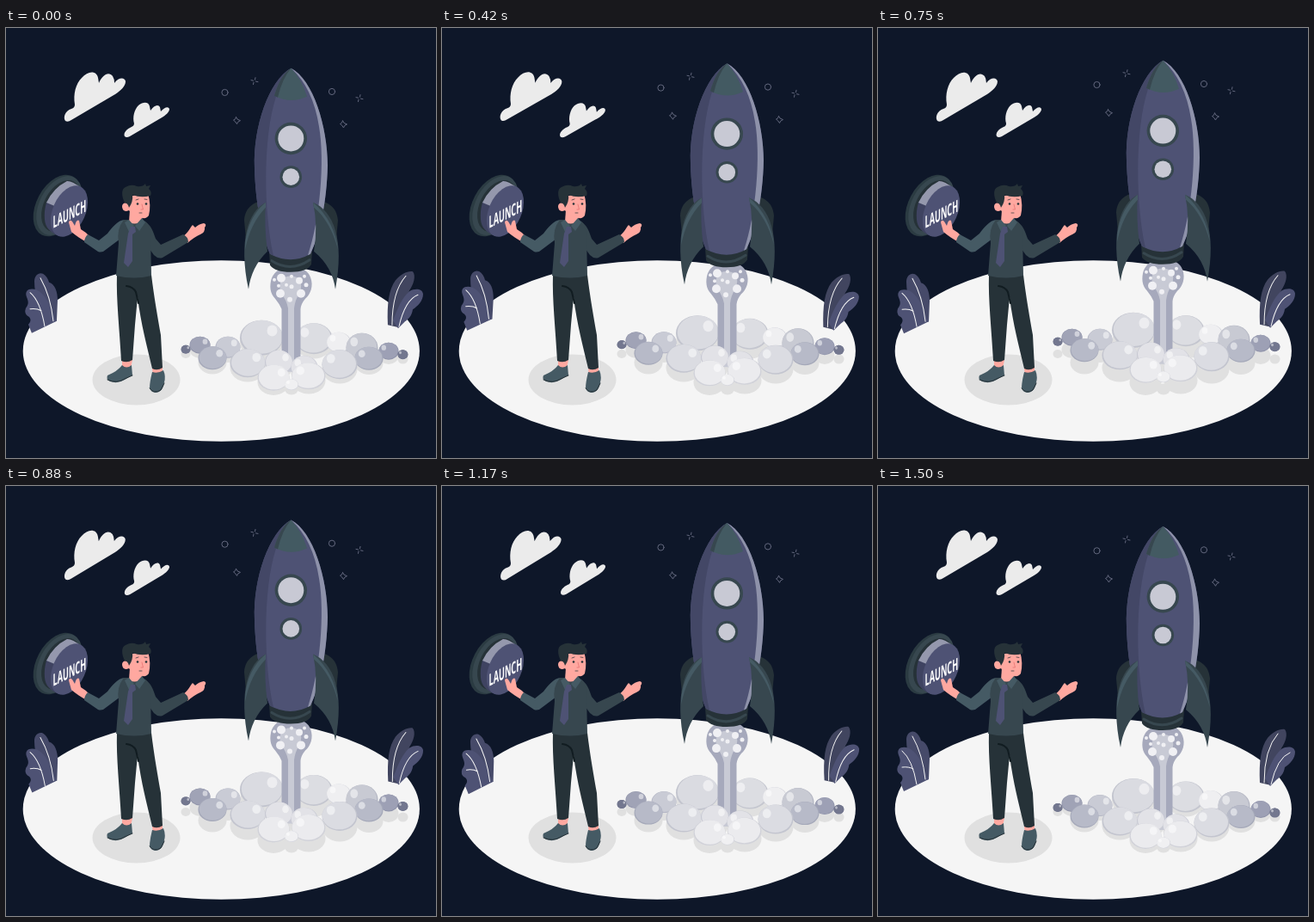
Recreate the animation shown at these times as an HTML page. Size 500 by 500 pixels, loop 1540 ms.

```html
<!DOCTYPE html>
<html lang="en">
<head>
<meta charset="utf-8">
<title>Launch</title>
<style>
html, body { margin: 0; height: 100%; overflow: hidden; background: #0e1729; }
svg { display: block; width: 100vw; height: 100vh; }
.label { font: bold 19.5px "Open Sans", sans-serif; fill: #fff; }
.line { fill: none; stroke-linecap: round; stroke-linejoin: round; }
</style>
</head>
<body>
<svg viewBox="0 0 500 500">
  <ellipse cx="250.3" cy="375.5" rx="230.6" ry="105.3" fill="#f5f5f5"/>
  <ellipse cx="151.5" cy="409" rx="51" ry="29.5" fill="#e0e0e0"/>
  <g id="shadows" fill="#e0e0e0"></g>

  <g id="clouds" fill="#ebebeb">
    <path d="M69 108C66 104 69 96 76 94Q80 93 80 89C78 77 81 65 88 58C95 50 105 49 107 58L108 64C112 55 119 50 124 56Q126 59 126 64C131 57 138 57 139 62C139 68 133 73 127 77L76 107Q72 110 69 108Z"/>
    <path d="M138 126C136 122 141 117 146 115Q149 114 149 111C147 104 149 95 154 90C160 85 166 86 167 91L168 96C172 90 177 88 179 92L180 97C185 91 190 91 190 95C189 99 184 103 178 106L144 126Q140 128 138 126Z"/>
  </g>

  <g id="plants">
    <path fill="#464a69" d="M40 346C39 328 33 310 33 295C33 288 38 284 43 286Q48 289 50 296C57 298 60 307 60 317L59 341Z"/>
    <path fill="#4e5274" d="M30 355L26 345C30 341 29 337 25 335Q21 332 23 326C27 321 26 318 24 313C21 305 28 302 36 305C43 308 50 318 53 329L59 341Z"/>
    <path fill="#41455f" d="M444 345C443 320 445 304 453 293C459 286 467 282 473 283C477 288 474 298 469 305L457 348Z"/>
    <path fill="#4e5274" d="M456 349L450 340C455 327 460 314 469 306C476 302 484 303 485 309C485 317 479 323 473 327C472 335 467 339 464 341Z"/>
    <g class="line" stroke="#f5f5f5">
      <path d="M40 291Q52 312 55 341M28 308Q40 318 45 347M28 327Q36 326 41 329M465 288Q449 306 449 345M479 310Q464 316 457 347"/>
    </g>
  </g>

  <g id="button">
    <ellipse cx="59.500" cy="206.500" rx="24" ry="38.500" transform="rotate(28 59.500 206.500)" fill="#2b3b42"/>
    <ellipse cx="62" cy="206.500" rx="23" ry="37" transform="rotate(28 62 206.500)" fill="#37474f"/>
    <ellipse cx="64" cy="207" rx="20" ry="32" transform="rotate(27 64 207)" fill="#263238"/>
    <path fill="#3f4361" d="M47 203L71 178Q77 179 87 186L62 242Q46 236 45 223Q44 213 47 203Z"/>
    <path fill="#9598ad" d="M47 203Q55 186 71 178Q78 178 87 186Q69 191 59 208Z"/>
    <ellipse cx="73.500" cy="213" rx="19" ry="31.500" transform="rotate(24 73.500 213)" fill="#4e5274"/>
    <text class="label" transform="matrix(.47 -.24 0 1 54.500 233)">LAUNCH</text>
  </g>

  <g id="man">
    <path fill="#ffa8a0" d="M135 387L147 386L145 396L135 397ZM170 395L182 394L182 405L171 406Z"/>
    <path fill="#455a64" d="M135 392Q140 397 146 392L147 404Q142 406 138 409Q130 414 121 411Q116 409 118 404Q130 399 135 392ZM170 400Q177 402 183 398Q186 405 184 412Q183 420 178 423Q170 426 167 419Q167 412 170 400Z"/>
    <path class="line" stroke="#263238" d="M118 409Q129 414 138 408L147 404M167 419Q172 426 180 421L184 413"/>
    <path fill="#263238" d="M129 287L169 287C172 312 177 340 180 357L182 395Q176 399 170 396C164 370 157 345 153 313L150 345L147 386Q141 390 134 387C132 350 128 315 129 287Z"/>
    <path class="line" stroke="#111c21" stroke-width="2" d="M140 300Q148 301 151 307L154 320"/>
    <path fill="#ffa8a0" d="M94 249C88 246 81 241 76 237L73 226Q74 222 77 225L80 230Q82 222 85 224L87 234Q94 238 98 243ZM206 242C212 238 214 232 217 229L220 232Q224 228 230 227Q234 228 231 232Q232 237 226 240Q219 243 211 250Z"/>
    <path fill="#455a64" d="M137 223C130 224 124 231 118 239L108 247L95 240Q91 244 91 249L107 260Q112 262 117 257L133 245Z"/>
    <path fill="#37474f" d="M161 225C168 228 171 236 174 245L180 252L206 240Q212 243 212 249L182 267Q177 269 172 264L161 249Z"/>
    <path fill="#37474f" d="M137 223L158 223C165 225 168 231 168 240L169 288Q149 293 128 288L131 250Q128 234 137 223Z"/>
    <path fill="#ffa8a0" d="M144 211L159 216L158 224Q152 230 143 226Z"/>
    <path fill="#455a64" d="M143 223L149 230L143 237L138 226ZM158 221L150 230L155 236L162 226Z"/>
    <path fill="#4e5274" d="M145 231L150 231L151 237L147 240L147 271L142 278L137 273L142 239Z"/>
    <path fill="#ffa8a0" d="M142 196L165 192Q169 206 166 218Q163 223 155 220Q147 218 143 212Q136 215 135 208Q135 202 142 204Z"/>
    <path fill="#263238" d="M143 209Q142 204 138 203C134 195 134 187 139 185Q146 181 152 184Q159 185 162 181L163 184L168 183L166 187Q170 190 168 195Q157 198 147 194Q148 202 143 209Z"/>
    <path class="line" stroke="#263238" stroke-width=".7" d="M151 200L154 199M161 199L164 199.500M155 215L158 215"/>
    <path class="line" stroke="#e57373" stroke-width=".8" d="M158 205L159.500 211L157 211"/>
    <g fill="#263238"><circle cx="153" cy="204.500" r="1.300"/><circle cx="163" cy="204.500" r="1.300"/></g>
  </g>

  <g id="lift">
    <g class="line" stroke="#62677d">
      <circle cx="254.500" cy="75.300" r="3.600"/>
      <circle cx="379" cy="74.300" r="3.600"/>
      <path id="star" d="M267.500 104Q268 107 272.500 108Q269 109 268.500 112Q267 109 264.500 107.500Q267 107 267.500 104Z"/>
      <use href="#star" transform="translate(124 4.300)"/>
      <path id="spark" d="M290 58L289.500 60.500M288 63.500L287.500 66M285 61L287.500 61.500M290.500 62.500L293 63"/>
      <use href="#spark" transform="translate(122 20)"/>
    </g>
    <g id="backPuffs"></g>
    <g id="exhaust">
      <path fill="#a6a9bc" d="M320.500 388L320.500 327Q318 321 313 315C307 309 306 300 309 291Q314 279 331 277Q350 279 354 290C358 300 354 310 348 315Q343 321 342.500 327L342.500 388Z"/>
      <path fill="#c8cad5" d="M328 400L328 326Q326 316 320 309Q316 298 322 291Q331 286 340 291Q346 299 341 309Q336 317 335 326L335 400Z"/>
      <g id="bubbles" fill="#f0f0f4"></g>
    </g>
    <g id="frontPuffs"></g>
    <g id="rocket">
      <path fill="#263238" d="M306 200C289 201 278 208 277 224L279 246L304 230ZM356 200C374 201 385 208 386 224L384 246L358 230Z"/>
      <path fill="#263238" d="M306 261L307 276Q313 284 331 284Q350 284 355 275L356 260Z"/>
      <path class="line" stroke="#37474f" stroke-width="3" d="M309 271Q331 285 353 270"/>
      <path fill="#4e5274" d="M331.500 47C306 61 287 115 289 163C290 205 298 242 307 263Q331 276 354 263C365 240 373 203 374 160C374 115 357 60 331.500 47Z"/>
      <path fill="#434766" d="M331.500 47C306 61 287 115 289 163C290 205 298 242 307 263L311 265C300 215 298 130 314 80Q321 59 331.500 47Z"/>
      <path fill="#8e92aa" d="M331.500 47C357 60 374 115 374 160C373 203 365 240 354 263L351 264.500C365 224 371 155 364 115Q357 70 331.500 47Z"/>
      <path fill="#435a62" d="M331.500 47Q319 55 312 79Q331 89 350 80Q344 60 331.500 47Z"/>
      <path fill="#37474f" d="M331.500 47Q319 55 312 79L316 81Q321 59 331.500 47Z"/>
      <g fill="#37474f"><circle cx="331.300" cy="128.800" r="18.700"/><circle cx="331.300" cy="173.500" r="12.800"/></g>
      <g fill="#c8c9d4"><circle cx="331.300" cy="128.800" r="15"/><circle cx="331.300" cy="173.500" r="9.800"/></g>
      <path fill="#37474f" d="M302 203C282 213 270 247 282 304C284 288 291 272 304 260Q300 231 302 203ZM357 203C381 213 394 247 383 304C381 288 373 272 358 260Q363 231 357 203Z"/>
      <path fill="#455a64" d="M302 203C285 217 278 238 278 258C282 238 290 221 302 209ZM357 203C374 217 384 238 386 258C381 238 371 219 358 209Z"/>
    </g>
  </g>
</svg>
<script>
const $ = id => document.getElementById(id);

function ellipse(parent, cx, cy, rx, ry, attrs = {}) {
  const el = document.createElementNS('http://www.w3.org/2000/svg', 'ellipse');
  Object.entries({ cx, cy, rx, ry, ...attrs }).forEach(([k, v]) => el.setAttribute(k, v));
  $(parent).append(el);
}

// Dark rim, lit body and a highlight on the side facing the exhaust.
function puff(parent, [x, y, rx, ry, color]) {
  const side = x < 331 ? 1 : -1;
  ellipse('shadows', x, y + 5, rx, ry);
  ellipse(parent, x, y, rx, ry, { fill: color });
  ellipse(parent, x, y, rx, ry, { fill: '#4e5274', opacity: .17 });
  ellipse(parent, x + side * rx * .03, y - ry * .04, rx * .96, ry * .95, { fill: color });
  ellipse(parent, x + side * rx * .5, y - ry * .4, rx * .24, ry * .32, { fill: '#fff', opacity: .5 });
}

const back = [
  [209, 374, 5.5, 5, '#73778f'], [225.5, 369, 12, 10, '#a0a3b6'],
  [258, 371.5, 14.5, 12.5, '#c9cbd5'], [297, 360.5, 25, 20.5, '#dadbe1'],
  [358, 361.5, 21.5, 18, '#dcdde2'], [387, 366, 14, 12, '#efeff1'],
  [414, 372, 18.5, 17, '#c8cad3'], [445, 376, 11.5, 10, '#9da0b5'],
  [461.5, 380, 6, 5.5, '#73778f']
];
const front = [
  [422, 384.5, 16.5, 13.5, '#b7bac8'], [240, 384, 16.5, 13.5, '#b7bac8'],
  [281, 390, 20.5, 16.5, '#dbdce2'], [388, 391.5, 20.5, 17, '#dbdce2'],
  [317, 389, 16, 14, '#e2e2e7'], [347, 395, 15.5, 13.5, '#e2e2e7'],
  [311, 407, 18.5, 15, '#ebebee'], [352, 405, 19.5, 15.5, '#ebebee'],
  [332, 415, 8, 6.5, '#f0f0f2']
];
back.forEach(p => puff('backPuffs', p));
front.forEach(p => puff('frontPuffs', p));

[[320, 291, 5], [341, 294, 4], [319, 309, 5], [343, 309, 5], [330, 316, 3], [332, 289, 2],
 [332, 301, 2.5], [312, 293, 2], [349, 299, 2.5], [317, 300, 2], [347, 289, 2], [326, 299, 2]]
  .forEach(([x, y, r]) => ellipse('bubbles', x, y, r, r));

function draw(now) {
  const phase = Math.min(1, (now % 1540 + 25) / 1500);
  const rise = 9.6 * (1 - Math.abs(2 * phase - 1));
  const sway = Math.asin(Math.sin(phase * 2 * Math.PI)) * 2 / Math.PI;
  $('lift').setAttribute('transform', `translate(0 ${-rise})`);
  $('plants').setAttribute('transform', `rotate(${sway} 253 300)`);
  $('clouds').setAttribute('transform', `rotate(${sway} 128 89)`);
  requestAnimationFrame(draw);
}
draw(performance.now());
</script>
</body>
</html>
```
